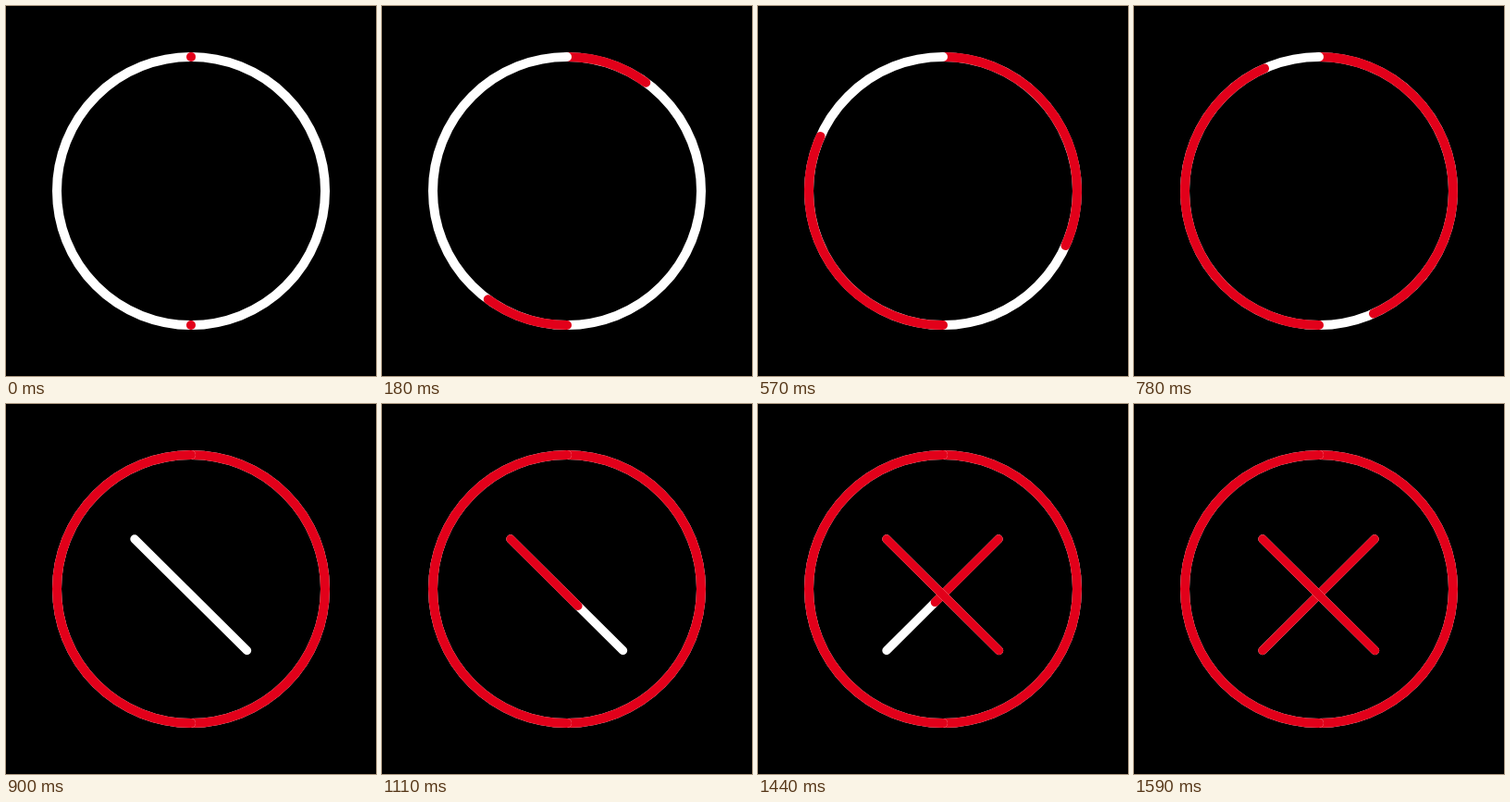
Write an HTML page that moves like this. It is 400x400 px and loops after 1660 ms.

```html
<!DOCTYPE html>
<html lang="en">
<head>
<meta charset="utf-8">
<title>Drawn cross in a ring</title>
<style>
  html, body { margin: 0; width: 100%; height: 100%; overflow: hidden; background: #000; }
  svg { display: block; width: 100vw; height: 100vh; }
  path { fill: none; stroke-width: 10; stroke-linecap: round; }
  .w { stroke: #fff; }
  .r { stroke: #e2001a; }
  .bar { stroke-width: 9.4; }
</style>
</head>
<body>
<svg viewBox="0 0 400 400">
  <path class="w" d="M200 55A145 145 0 0 1 200 345"/>
  <path class="r" id="right"/>
  <path class="w" d="M200 345A145 145 0 0 1 200 55"/>
  <path class="r" id="left"/>
  <path class="r" id="dot" d="M200 55h.01"/>
  <path class="w bar" id="whiteB" d="M260 146L139 266.5"/>
  <path class="r bar" id="redB"/>
  <path class="w bar" id="whiteA" d="M139 146L260.5 266.5"/>
  <path class="r bar" id="redA"/>
</svg>
<script>
const LOOP = 1660, STEP = 30, LAST = 1590;
const RING = 900, SECOND = 1250;
const el = id => document.getElementById(id);
const clamp = v => Math.max(0, Math.min(1, v));
const show = (id, on) => el(id).style.display = on ? '' : 'none';

// Half ring drawn clockwise; side is 1 from the top, -1 from the bottom
function arc(id, side, p) {
  const a = Math.max(0.0002, p * Math.PI);
  const x = 200 + side * 145 * Math.sin(a);
  const y = 200 - side * 145 * Math.cos(a);
  el(id).setAttribute('d', `M200 ${200 - side * 145}A145 145 0 0 1 ${x} ${y}`);
}

function bar(id, x0, y0, x1, y1, p) {
  show(id, p > 0);
  el(id).setAttribute('d', `M${x0} ${y0}L${x0 + (x1 - x0) * p} ${y0 + (y1 - y0) * p}`);
}

function draw(ms) {
  const t = Math.min(LAST, Math.floor((ms % LOOP) / STEP + 1e-6) * STEP);
  const ring = clamp(t / RING);
  arc('right', 1, ring);
  arc('left', -1, ring);
  show('dot', t === 0);
  show('whiteA', t >= RING);
  show('whiteB', t >= SECOND);
  bar('redA', 139, 146, 260.5, 266.5, clamp((t - RING) / 350));
  bar('redB', 260, 146, 139, 266.5, clamp((t - SECOND) / 335));
}

let start = null;
function tick(now) {
  if (start === null) start = now;
  draw(now - start);
  requestAnimationFrame(tick);
}
draw(0);
requestAnimationFrame(tick);
</script>
</body>
</html>
```
